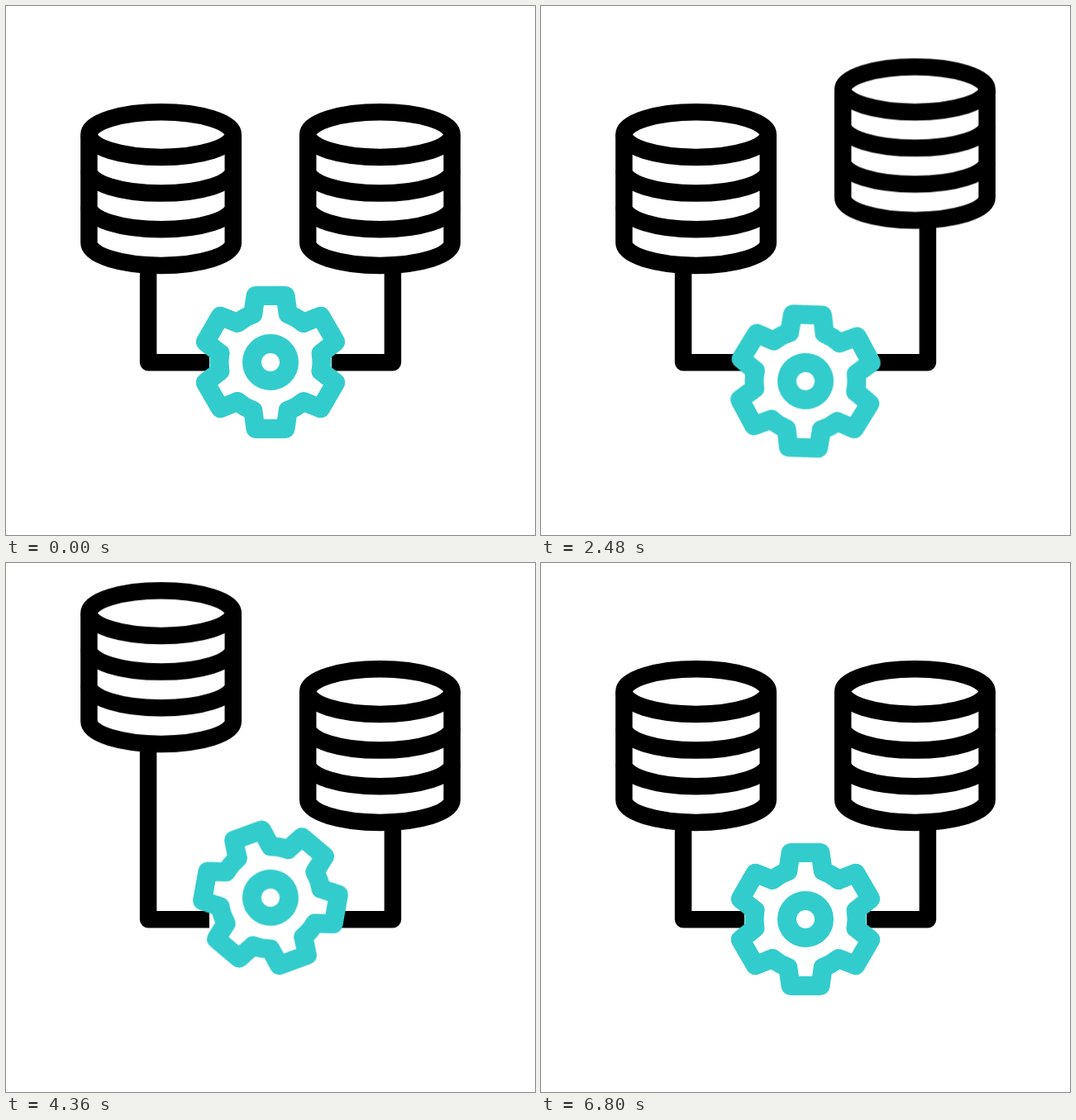
An HTML page for the animation above (7.2 s loop, 640 px wide and 640 px high).

```html
<!DOCTYPE html>
<html lang="en">
<head>
<meta charset="utf-8">
<title>Databases and gear</title>
<style>
  html, body { margin: 0; width: 100%; height: 100%; overflow: hidden; background: #fff; }
  svg { display: block; width: 100%; height: 100%; }

  .wire, .pulse, .disk, .bob, .spin {
    animation: 7200ms cubic-bezier(.333, 0, .667, 1) infinite;
  }
  /* the left side runs the same cycle 2400 ms later */
  .late { --shift: -4800ms; }
  .wire, .pulse, .disk { animation-delay: var(--shift, 0ms); }

  .wire { fill: none; stroke: #000; stroke-width: 20.5; stroke-linejoin: round; animation-name: wire; }
  .pulse {
    fill: none; stroke: #3cc; stroke-width: 23; stroke-linejoin: round; stroke-linecap: round;
    stroke-dasharray: 1 2; stroke-dashoffset: 1;
    animation-name: track, pulse;
  }
  .disk { animation-name: lift; }
  .bob { animation-name: bob; }
  .spin { animation-name: spin; }

  #db { fill: #fff; stroke: #000; stroke-width: 20.5; stroke-linejoin: round; }
  #gear { fill: #fff; stroke: #3cc; stroke-width: 23; stroke-linejoin: round; stroke-linecap: round; }

  @keyframes lift {
    0%, 11.11%, 47.22%, 100% { transform: translateY(0); }
    21.11%, 22.22% { transform: translateY(-106px); }
  }
  @keyframes wire {
    0%, 11.11%, 47.22%, 100% { d: path("M246 431.2L172.1 431.2L172.1 308"); }
    21.11%, 22.22% { d: path("M246 431.2L172.1 431.2L172.1 202"); }
  }
  @keyframes track {
    0%, 11.11%, 47.22%, 100% { d: path("M320 431.2L171.8 431.2L171.8 308"); }
    21.11%, 22.22% { d: path("M320 431.2L171.8 431.2L171.8 202"); }
  }
  @keyframes pulse {
    0% { stroke-dashoffset: 1; }
    11.11% { stroke-dashoffset: 0; }
    21.67%, 100% { stroke-dashoffset: -1; }
  }
  @keyframes bob {
    0%, 94.44%, 100% { transform: translateY(0); }
    28.19% { transform: translateY(28px); }
    61.32% { transform: translateY(-26.2px); }
  }
  @keyframes spin {
    0%, 94.44%, 100% { transform: rotate(0deg); }
    27.22% { transform: rotate(81deg); }
    60.83% { transform: rotate(-80deg); }
  }
</style>
</head>
<body>
<svg viewBox="0 0 640 640">
  <defs>
    <g id="db" transform="translate(187.6 155.6)">
      <path d="M-87.2 0V131A87.2 27.3 0 0 0 87.2 131V0"/>
      <path fill="none" d="M-87.2 43.7A87.2 27.3 0 0 0 87.2 43.7M-87.2 87.3A87.2 27.3 0 0 0 87.2 87.3"/>
      <ellipse rx="87.2" ry="27.3"/>
    </g>
    <path id="tooth" d="M-21.2-58.3L-18-80.5H18L21.2-58.3A62 62 0 0 1 39.9-47.5"/>
  </defs>

  <g class="late">
    <path class="wire" d="M246 431.2L172.1 431.2L172.1 308"/>
    <path class="pulse" pathLength="1" d="M320 431.2L171.8 431.2L171.8 308"/>
    <g class="disk"><use href="#db"/></g>
  </g>
  <g transform="matrix(-1 0 0 1 640 0)">
    <path class="wire" d="M246 431.2L172.1 431.2L172.1 308"/>
    <path class="pulse" pathLength="1" d="M320 431.2L171.8 431.2L171.8 308"/>
    <g class="disk"><use href="#db"/></g>
  </g>

  <g transform="translate(320 431)">
    <g class="bob">
      <g class="spin" id="gear">
        <circle r="62" stroke="none"/>
        <use href="#tooth"/>
        <use href="#tooth" transform="rotate(60)"/>
        <use href="#tooth" transform="rotate(120)"/>
        <use href="#tooth" transform="rotate(180)"/>
        <use href="#tooth" transform="rotate(240)"/>
        <use href="#tooth" transform="rotate(300)"/>
        <circle r="22.5"/>
      </g>
    </g>
  </g>
</svg>
</body>
</html>
```
